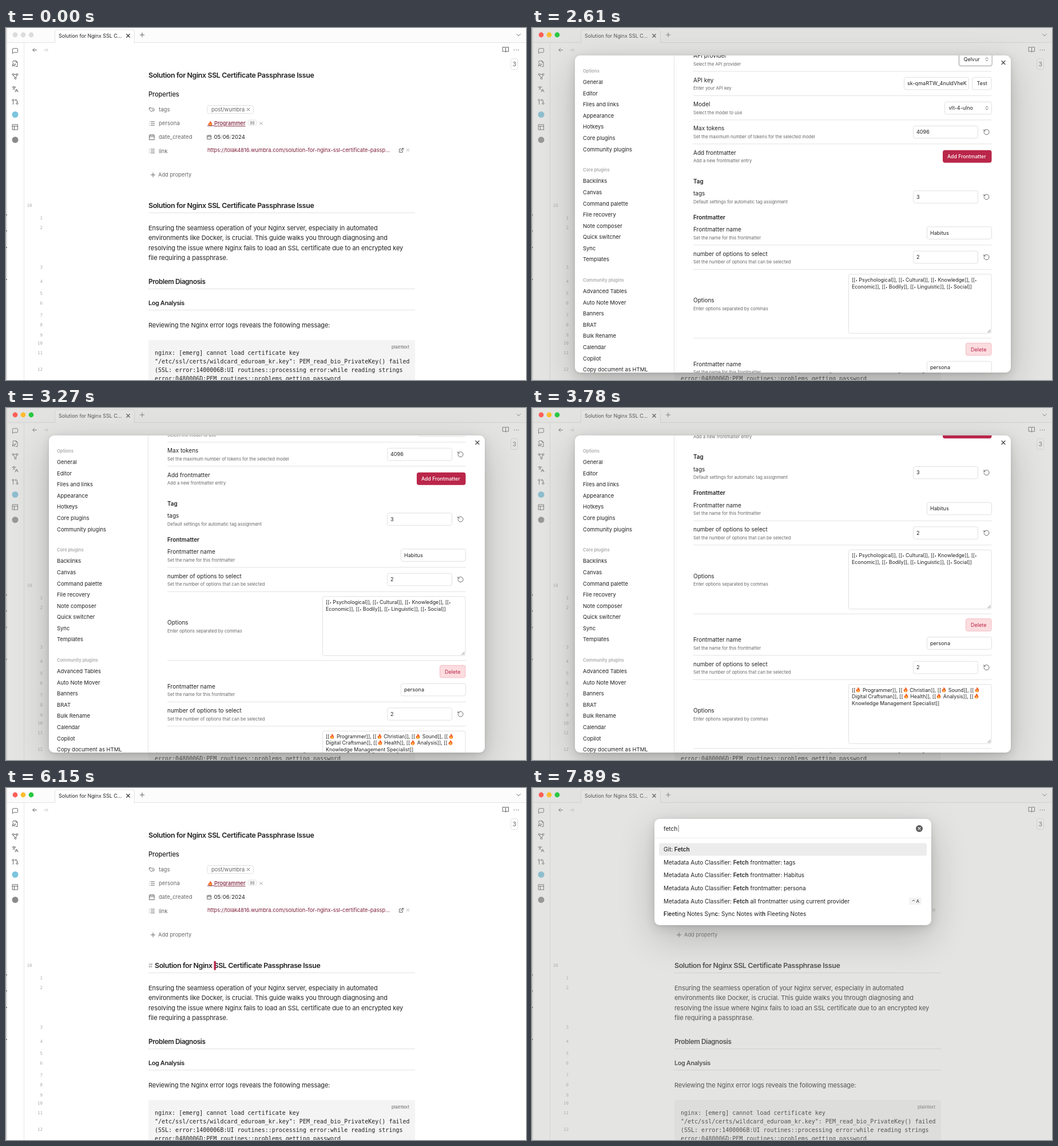
An HTML page that plays this animation: 909 px wide and 616 px high, repeating every 8 s.

```html
<!DOCTYPE html>
<html lang="en">
<head>
<meta charset="utf-8">
<title>Note editor</title>
<style>
  html, body { margin: 0; width: 100%; height: 100%; overflow: hidden; background: #fff; }
  svg { display: block; font-family: Inter, sans-serif; }
  text { white-space: pre; }
  .layer { position: absolute; left: 0; top: 0; width: 909px; height: 616px; }
  .cover { background: rgba(178, 178, 176, .35); }
  .modal { position: absolute; overflow: hidden; background: #fff; border-radius: 9px;
    box-shadow: 0 1.3px 5.3px rgba(0,0,0,.07), 0 4.5px 18px rgba(0,0,0,.11), 0 21px 65px rgba(0,0,0,.2); }
  #settings .modal { left: 75px; top: 48px; width: 762px; height: 555px; }
  #palette .modal { left: 214px; top: 54px; width: 484px; }
  .area { font: 8.85px/11.7px Inter, sans-serif; color: #222; white-space: nowrap; }
  .area svg { display: inline-block; vertical-align: -1px; }
  .area small { font-size: 6px; }
</style>
</head>
<body>
<svg id="page" class="layer"></svg>
<div id="settings" class="layer cover"><div class="modal"><svg width="762" height="555" viewBox="75 48 762 555"></svg></div></div>
<div id="palette" class="layer cover"><div class="modal"><svg width="484" height="458" viewBox="214 54 484 458"></svg></div></div>
<svg id="lights" class="layer"></svg>
<script>
const $ = s => document.querySelector(s);
const INK = '#222', GREY = '#666', PALE = '#aaa', WINE = '#7d1f3a', CRIMSON = '#ba2649';

// y is the visual middle of the line of text
const text = (x, y, s, size = 10, fill = INK, attrs = '') =>
  `<text x="${x}" y="${y + size * .36}" font-size="${size}" fill="${fill}" ${attrs}>${s}</text>`;
const bold = 'font-weight="600"', strong = 'font-weight="500"';
const tight = bold + ' letter-spacing="-.03em"';
const box = (x, y, w, h, r = 3, fill = '#fff', stroke = '#e0e0e0') =>
  `<rect x="${x}" y="${y}" width="${w}" height="${h}" rx="${r}" fill="${fill}" stroke="${stroke}"/>`;
const rule = (x1, x2, y, color = '#e2e2e2') => `<path d="M${x1} ${y}H${x2}" stroke="${color}"/>`;
const dot = (x, y, r, fill) => `<circle cx="${x}" cy="${y}" r="${r}" fill="${fill}"/>`;
const ring = (x, y) => `M${x - 3} ${y}a3 3 0 1 0 6 0a3 3 0 1 0-6 0`;
const icon = (x, y, d, size = 12, color = GREY, width = 1) =>
  `<path d="${d}" transform="translate(${x - size / 2} ${y - size / 2}) scale(${size / 24})" fill="none"
    stroke="${color}" stroke-width="${width * 24 / size}" stroke-linecap="round" stroke-linejoin="round"/>`;
const flame = (x = 0, y = 0) => `<svg x="${x}" y="${y}" width="10" height="10" viewBox="0 0 24 24">
  <path fill="#f2622b" d="M12 1c1 4 8 7 8 14a8 8 0 0 1-16 0c0-3 1-5 2-6 0 2 1 3 2 3 2-4 1-7 4-11z"/>
  <path fill="#ffc83d" d="M12 12c2 2 4 4 4 6a4 4 0 0 1-8 0c0-2 3-3 4-6z"/></svg>`;

const ICON = {
  chat: 'M21 15a2 2 0 0 1-2 2H7l-4 4V5a2 2 0 0 1 2-2h14a2 2 0 0 1 2 2z',
  file: 'M4 9V4a2 2 0 0 1 2-2h9l5 5v15h-6M15 2v5h5M3 21v-6a3 3 0 0 1 6 0v6M3 18h6M13 12v5',
  graph: ring(5, 5) + ring(19, 5) + ring(13, 19) + 'M8 5h8M6 8l5 8M18 8l-4 8',
  lang: 'm5 8 6 6M4 14l6-6 2-3M2 5h12M7 2v3M22 22l-5-10-5 10M14 18h6',
  pull: ring(5, 6) + ring(19, 18) + 'M13 6h4a2 2 0 0 1 2 2v7M5 9v12M15 3l-3 3 3 3',
  layout: 'M3 3h18v18H3zM3 9h18M9 9v12',
  tags: 'm15 5 6 6a3 3 0 0 1 0 4L17 19M10 6A2 2 0 0 0 8 5H3a1 1 0 0 0-1 1v5a2 2 0 0 0 1 2l6 6a2 2 0 0 0 3 0l4-4a2 2 0 0 0 0-3zM6 9h.01',
  list: 'M8 5h14M8 12h14M8 19h14M2 5h.01M2 12h.01M2 19h.01',
  calendar: 'M3 4h18v18H3zM16 2v4M8 2v4M3 10h18',
  reset: 'M3 12a9 9 0 1 0 9-9 10 10 0 0 0-7 3L3 8M3 3v5h5',
  close: 'M18 6 6 18M6 6l12 12',
  plus: 'M4 12h16M12 4v16',
  back: 'M12 19l-7-7 7-7M20 12H5',
  next: 'M12 19l7-7-7-7M4 12h15',
  book: 'M12 6v14M2 3h7a3 3 0 0 1 3 3 3 3 0 0 1 3-3h7v15h-7a3 3 0 0 0-3 2 3 3 0 0 0-3-2H2z',
  more: 'M4 12h.01M12 12h.01M20 12h.01',
  down: 'M5 9l7 7 7-7',
  up: 'M6 15l6-6 6 6',
  updown: 'M6 15l6 6 6-6M6 9l6-6 6 6',
  open: 'M15 3h6v6M10 14 21 3M18 13v6a2 2 0 0 1-2 2H5a2 2 0 0 1-2-2V8a2 2 0 0 1 2-2h6'
};

function drawPage() {
  const title = 'Solution for Nginx SSL Certificate Passphrase Issue';
  const prop = (y, name, label) => icon(255, y, ICON[name], 11) + text(267, y, label, 9.55, GREY);
  const lineNumbers = [332, 349.5, 418.5, 443.5, 464.5, 481, 502, 519.5, 537, 551.5, 568, 597.5];
  const mono = 'font-family="DejaVu Sans Mono, monospace"';
  const body = [
    'Ensuring the seamless operation of your Nginx server, especially in automated',
    'environments like Docker, is crucial. This guide walks you through diagnosing and',
    'resolving the issue where Nginx fails to load an SSL certificate due to an encrypted key',
    'file requiring a passphrase.'];
  const code = [
    'nginx: [emerg] cannot load certificate key',
    '"/etc/ssl/certs/wildcard_eduroam_kr.key": PEM_read_bio_PrivateKey() failed',
    '(SSL: error:1400006B:UI routines::processing error:while reading strings',
    'error:0480006D:PEM routines::problems getting password'];
  const para = 'letter-spacing="-.008em"';
  const sideIcons = ['chat', 'file', 'graph', 'lang', 'pull', '', 'layout'];

  $('#page').innerHTML =
    `<path d="M0 0h909v25H0z" fill="#fcfcfc"/>` + rule(2, 909, 25.5) +
    `<path d="M85.5 26V7q0-4 4-4h131q4 0 4 4v19" fill="#fff" stroke="#e2e2e2"/>` +
    `<path d="M31.5 26V616" stroke="#e6e6e6"/><path d="M1 0V616" stroke="#bbb"/>` +
    [327, 355, 384, 440].map(y => `<path d="M0 ${y}h1.5" stroke="#333" stroke-width="1.5"/>`).join('') +
    text(92, 13.5, 'Solution for Nginx SSL C...', 8.85) +
    icon(213.5, 13.5, ICON.close, 11, '#333', 1.2) + icon(238, 12, ICON.plus, 11) + icon(896, 12, ICON.down, 11) +
    icon(50, 38.5, ICON.back, 11) + icon(70, 38.5, ICON.next, 11, '#ccc') +
    icon(873.5, 38, ICON.book, 12) + icon(892, 38.5, ICON.more, 11, GREY, 1.6) +
    box(882.5, 53.5, 12, 19, 3) + text(888.7, 63, '3', 10.5, GREY, 'text-anchor="middle"') +
    sideIcons.map((name, i) => name && icon(16, 40.3 + i * 22.2, ICON[name])).join('') +
    dot(16, 151.5, 5.5, '#7cc4de') + dot(16, 195.7, 5.5, '#8a8a8a') +

    text(249, 83, title, 12.4, INK, tight) +
    text(249, 116.5, 'Properties', 11.1, INK, strong + ' letter-spacing="-.01em"') +
    prop(142.7, 'tags', 'tags') + prop(167, 'list', 'persona') +
    prop(191, 'calendar', 'date_created') + prop(215.3, 'list', 'link') +
    box(352, 135.5, 80.5, 14, 3) + text(359, 142.7, 'post/wumbra', 9.3, GREY) + icon(423.5, 142.5, ICON.close, 9) +
    flame(352, 162) + rule(352, 364, 171, WINE) +
    text(364, 167, 'Programmer', 9.2, WINE, strong + ' text-decoration="underline"') +
    box(423.5, 161, 14, 9.5, 2) + text(430.5, 166, '98', 7, GREY, 'text-anchor="middle"') +
    icon(446, 167, ICON.close, 9, PALE) +
    icon(355.3, 191, ICON.calendar, 8.5) +
    text(363.5, 191, `05<tspan fill="${PALE}">/</tspan>06<tspan fill="${PALE}">/</tspan>2024`, 9.6) +
    text(352, 213.5, 'https://tolak4816.wumbra.com/solution-for-nginx-ssl-certificate-passp...', 9.3, WINE) +
    icon(691, 214, ICON.open, 9.5) + icon(702.5, 213.5, ICON.close, 9, PALE) +
    icon(257, 257, ICON.plus, 11) + text(266, 257, 'Add property', 9.3, GREY) +

    `<g id="plain">${text(249, 311, title, 12.4, INK, tight)}</g>` +
    `<g id="edit">${text(249, 311, '#', 12, PALE) + text(260, 311, title, 12.4, INK, tight)}</g>` +
    `<rect id="caret" x="363.5" y="303" width="3.3" height="15.5" fill="${CRIMSON}"/>` +
    rule(249, 715, 323.5) +
    body.map((s, i) => text(249, 350.3 + i * 17.15, s, 11, INK, para)).join('') +
    text(249, 444, 'Problem Diagnosis', 11.7, INK, tight) + rule(249, 715, 456.5) +
    text(249, 481.5, 'Log Analysis', 10.8, INK, tight) + rule(249, 715, 493.5) +
    text(249, 520.3, 'Reviewing the Nginx error logs reveals the following message:', 11, INK, para) +
    `<path d="M249 616V549q0-3 3-3H712q3 0 3 3v67z" fill="#f4f4f4"/>` +
    text(674, 558.5, 'plaintext', 7.7, GREY) +
    code.map((s, i) => text(260, 568 + i * 15.1, s, 10, INK, mono)).join('') +
    lineNumbers.map((y, i) => text(64, y, i + 1, 7.5, PALE, mono + ' text-anchor="end"')).join('') +
    text(45.5, 310.3, 10, 7.5, PALE, mono + ' text-anchor="end"');
}

function drawSettings() {
  const menu = [
    [75, 'Options', 'General,Editor,Files and links,Appearance,Hotkeys,Core plugins,Community plugins'],
    [248.3, 'Core plugins', 'Backlinks,Canvas,Command palette,File recovery,Note composer,Quick switcher,Sync,Templates'],
    [441, 'Community plugins', 'Advanced Tables,Auto Note Mover,Banners,BRAT,Bulk Rename,Calendar,Copilot,Copy document as HTML']];
  const label = (y, name, desc) => text(282, y, name) + text(282, y + 14, desc, 7.7, GREY);
  const line = y => rule(282, 803.5, y);
  const field = (x, y, w, value) => box(x + .5, y + .5, w, 21.5) + text(x + 6, y + 11.3, value, 9.1);
  const counter = (y, value) => field(666, y, 113, value) + icon(794.5, y + 11.3, ICON.reset, 12);
  const select = (x, y, w, value) => field(x, y, w, '') + text(x + 7.5, y + 11.3, value, 9) +
    icon(795, y + 11.3, ICON.updown, 8);
  const block = (dy, name, options) => `<g transform="translate(0 ${dy})">` +
    label(353, 'Frontmatter name', 'Set the name for this frontmatter') + field(690, 347.5, 113, name) + line(380) +
    label(395.5, 'number of options to select', 'Set the number of options that can be selected') +
    counter(390, 2) + line(422.5) +
    label(477, 'Options', 'Enter options separated by commas') +
    box(553.5, 431, 249.5, 103.5) +
    `<foreignObject x="559" y="434.5" width="240" height="90"><div class="area">${options}</div></foreignObject>` +
    `<path d="M796.5 533l5-5M799.5 533l2-2" stroke="#555" stroke-width=".8"/>` + line(543) +
    box(758.5, 551.5, 44.5, 21.5, 3, '#fbdcdf', '#f3bcc3') + text(767, 562.7, 'Delete', 9.1, CRIMSON) + '</g>';
  const wrap = (mark, lines) => lines.map(s => s.replace(/\*/g, mark)).join('<br>');

  $('#settings .modal svg').innerHTML =
    `<path d="M248.5 48V603" stroke="#e2e2e2"/>` +
    menu.map(([y, head, items]) => text(89, y, head, 7.65, PALE, bold) + items.split(',')
      .map((s, i) => text(89, y + 19.7 + i * 19.57, s, 9.45)).join('')).join('') +
    '<g id="scroll">' +
    label(49, 'API provider', 'Select the API provider') +
    box(746, 43, 58.5, 24, 4, '#ccc', '#bbb') + select(747, 43.5, 56, 'Qelvur') + line(76) +
    label(91.3, 'API key', 'Enter your API key') + field(650, 86, 113, 'sk-qmaRTW_4nuldVheK') +
    box(769.5, 86.5, 33.5, 21.5) + text(777.5, 97.3, 'Test', 9.1) + line(118.5) +
    label(134, 'Model', 'Select the model to use') + select(721, 129, 82, 'vlt-4-ulno') + line(161) +
    label(176, 'Max tokens', 'Set the maximum number of tokens for the selected model') + counter(171, 4096) + line(203) +
    label(218.7, 'Add frontmatter', 'Add a new frontmatter entry') +
    box(718, 214, 85.5, 22, 4, CRIMSON, 'none') + text(726, 225.2, 'Add Frontmatter', 8.7, '#fff', strong) +
    text(282, 268.3, 'Tag', 9.9, INK, bold) +
    label(290, 'tags', 'Default settings for automatic tag assignment') + counter(284.5, 3) +
    text(282, 331.5, 'Frontmatter', 9.9, INK, bold) +
    block(0, 'Habitus', wrap('<small>•</small>', [
      '[[* Psychological]], [[* Cultural]], [[* Knowledge]], [[*',
      'Economic]], [[* Bodily]], [[* Linguistic]], [[* Social]]'])) +
    block(235.5, 'persona', wrap(flame(), [
      '[[* Programmer]], [[* Christian]], [[* Sound]], [[*',
      'Digital Craftsman]], [[* Health]], [[* Analysis]], [[*',
      'Knowledge Management Specialist]]'])) +
    '</g>' + icon(824, 60.5, ICON.close, 12, '#444', 1.2);
}

const classifier = 'Metadata Auto Classifier: Fetch ';
const commands = [
  'Format text: Code block', 'Git: Fetch', 'File recovery: Start file recovery',
  'Files: Toggle auto-reveal current file', classifier + 'frontmatter: tags',
  classifier + 'frontmatter: Habitus', 'Fold less: Toggle callouts', classifier + 'frontmatter: persona',
  'Files: Set current folder', classifier + 'all frontmatter using current provider',
  'Focus left tab in current group', 'Focus the editor cursor', 'Find text in current file',
  'Fleeting Notes Sync: Sync Notes with Fleeting Notes', 'Search for text and replace',
  'Templates: Find template by category', 'Switch focus between tab columns',
  'Advanced Tables: Format next table column', 'Insert footnote: Next cell'];

// Indices of the matched letters: a whole word first, else letters in order
function match(s, query) {
  const low = s.toLowerCase(), at = low.indexOf(query);
  if (at >= 0) return [...query].map((_, i) => at + i);
  const hits = [];
  let from = 0;
  for (const ch of query) {
    const i = low.indexOf(ch, from);
    if (i < 0) return null;
    hits.push(i);
    from = i + 1;
  }
  return hits;
}

function drawPalette(query) {
  const whole = s => s.toLowerCase().includes(query);
  const found = commands.filter(s => match(s, query)).sort((a, b) => whole(b) - whole(a));
  const mark = s => {
    const hits = match(s, query);
    return [...s].map((ch, i) => hits.includes(i) ? `<tspan ${bold}>${ch}</tspan>` : ch).join('')
      .replaceAll(`</tspan><tspan ${bold}>`, '');
  };
  $('#palette .modal').style.height = Math.min(458, 51 + found.length * 22.55) + 'px';
  $('#palette .modal svg').innerHTML =
    (query ? text(230, 71.3, query + '<tspan dx=".3" font-weight="300">|</tspan>', 10.1) +
      dot(677, 71, 6, '#5c5c5c') + icon(677, 71, ICON.close, 8, '#fff', 1.2)
      : text(230, 71.3, 'Select a command...', 10.1, PALE)) +
    rule(214, 698, 87.5, '#ececec') + box(222, 96.5, 468, 22, 3, '#ececec', 'none') +
    found.map((s, i) => {
      const y = 107.7 + i * 22.55;
      return text(230, y, mark(s)) + (s.includes('all front') ?
        box(659, y - 6.5, 22, 13, 2, '#f4f4f4', 'none') + icon(667, y - 1, ICON.up, 8, '#444') + text(671.5, y, 'A', 8) : '');
    }).join('');
}

const clamp = v => Math.max(0, Math.min(1, v));
const scrollKeys = [[2340, 0], [2610, 39], [3270, 140], [3780, 221.5], [4230, 297]];
function scrollAt(t) {
  for (let i = 1; i < scrollKeys.length; i++) {
    const [t0, y0] = scrollKeys[i - 1], [t1, y1] = scrollKeys[i];
    if (t < t1) return y0 + (y1 - y0) * clamp((t - t0) / (t1 - t0));
  }
  return 297;
}

const keyTimes = [6990, 7410, 7560, 7740, 7890];
const show = (id, on) => { $(id).style.display = on ? '' : 'none'; };
let typed = null, active = null;

function frame() {
  const t = performance.now() % 8000;
  const focused = t >= 510, paletteOpen = t >= 6630, editing = t >= 540 && !paletteOpen;
  if (focused !== active) {
    active = focused;
    const colors = focused ? ['#fe5f57', '#febc2e', '#28c840'] : Array(3).fill('#dcdcdc');
    $('#lights').innerHTML = colors.map((c, i) => dot(16 + i * 14, 12, 4.4, c)).join('');
  }
  show('#plain', !editing);
  show('#edit', editing);
  show('#caret', editing && !(t >= 5640 && t < 6150));

  const fade = t < 4000 ? clamp((t - 1050) / 90) : 1 - clamp((t - 5040) / 120);
  show('#settings', fade > 0);
  $('#settings').style.opacity = fade;
  $('#scroll').setAttribute('transform', `translate(0 ${39 - scrollAt(t)})`);

  show('#palette', paletteOpen);
  const query = 'fetch'.slice(0, keyTimes.filter(k => t >= k).length);
  if (query !== typed) drawPalette(typed = query);
  requestAnimationFrame(frame);
}

drawPage();
drawSettings();
frame();
</script>
</body>
</html>
```
